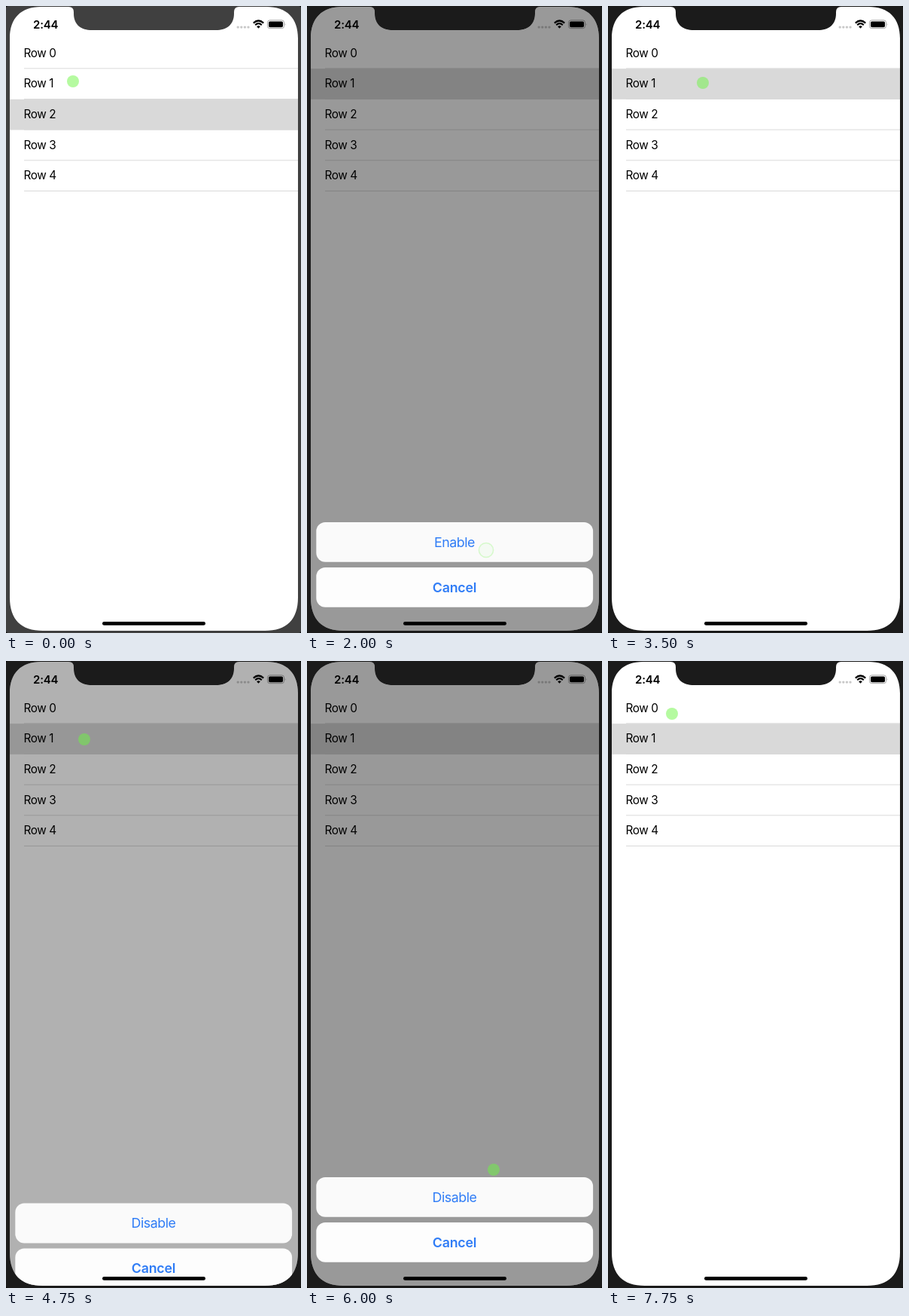
An HTML page for the animation above (8000 ms loop, 392 px wide and 832 px high).

```html
<!DOCTYPE html>
<html lang="en">
<head>
<meta charset="utf-8">
<title>Row action sheet</title>
<style>
  html, body { margin: 0; width: 100%; height: 100%; overflow: hidden; background: #000; }
  svg { display: block; width: 392px; height: 832px; font-family: Inter, Roboto, sans-serif; }
  .row { font-size: 15.3px; letter-spacing: -.4px; }
  .clock { font-size: 15px; font-weight: 600; letter-spacing: -.2px; }
  .button { font-size: 17.8px; letter-spacing: -.45px; text-anchor: middle; fill: #2f7cf6; }
  .bold { font-weight: 600; letter-spacing: -.2px; }
</style>
</head>
<body>
<svg viewBox="0 0 392 832">
  <defs>
    <clipPath id="screen">
      <path d="M47 1H83Q90 1 90 8V10C90 25 100 32 114 32H279C293 32 303 25 303 10V8Q303 1 310 1H346C373 1 388 16 388 43V785C388 814 373 829 344 829H49C20 829 5 814 5 785V43C5 16 20 1 47 1Z"/>
    </clipPath>
  </defs>
  <rect id="bezel" width="392" height="832" rx="3"/>
  <g clip-path="url(#screen)">
    <rect width="392" height="832" fill="#fff"/>
    <g id="list"></g>
    <rect id="selected" x="5" width="383" height="40.7" fill="#d9d9d9"/>
    <g id="labels"></g>
    <text class="clock" x="36" y="29.8">2:44</text>
    <g id="signal" fill="#c8c8c8"></g>
    <g fill="none" stroke="#000" stroke-width="2.2">
      <path d="M328.8 22.6Q335.5 16.4 342.2 22.6"/>
      <path d="M331.2 25.2Q335.5 21.2 339.8 25.2"/>
    </g>
    <path d="M333.1 27.2Q335.5 25.2 337.9 27.2L335.5 29.8Z"/>
    <rect x="347.5" y="18.9" width="22" height="10.8" rx="3" fill="#fff" stroke="#a3a3a3"/>
    <rect x="349" y="20.4" width="19" height="7.8" rx="1.7"/>
    <path d="M370.8 22.4Q372.4 24.3 370.8 26.2Z" fill="#a3a3a3"/>
    <rect id="dim" width="392" height="832"/>
    <g id="sheet">
      <rect x="12.3" y="685" width="367.8" height="52.8" rx="12" fill="#fafafa"/>
      <rect x="12.3" y="745" width="367.8" height="52.8" rx="12" fill="#fdfdfd"/>
      <text id="action" class="button" x="196" y="717.9"></text>
      <text class="button bold" x="196" y="777.9">Cancel</text>
    </g>
    <rect x="128" y="817" width="137" height="4.8" rx="2.4"/>
  </g>
  <circle id="touch"/>
</svg>
<script>
const $ = id => document.getElementById(id);
const LOOP = 8000, STEP = 250, ROW = 40.65, TOP = 42.2, TRAVEL = 147;

// pointer path: time, x, y
const path = [
  [0, 89, 100], [500, 80, 108], [750, 82, 122], [1750, 238, 720], [2000, 238, 722],
  [2500, 144, 175], [3500, 126, 102], [3750, 104, 104], [4750, 104, 104],
  [6000, 248, 675], [6250, 245, 708], [6500, 243, 711], [7500, 84, 47], [7750, 85, 70]
];
// action sheets: label, opening time, closing time
const sheets = [['Enable', 541, 2070], ['Disable', 4566, 6350]];
const presses = [750, 2000, 4500, 6250];

function add(parent, tag, attrs, text) {
  const el = document.createElementNS('http://www.w3.org/2000/svg', tag);
  for (const k in attrs) el.setAttribute(k, attrs[k]);
  if (text) el.textContent = text;
  $(parent).appendChild(el);
}

function set(id, attrs) {
  for (const k in attrs) $(id).setAttribute(k, attrs[k]);
}

for (let i = 0; i < 5; i++) {
  const y = TOP + i * ROW;
  add('list', 'rect', { x: 24, y: y + ROW - .5, width: 364, height: 1, fill: '#dadada' });
  add('labels', 'text', { class: 'row', x: 23.6, y: y + 25.4 }, 'Row ' + i);
}
for (let i = 0; i < 4; i++) add('signal', 'circle', { cx: 308.2 + i * 4.6, cy: 28.1, r: 1.7 });

// critically damped spring
function spring(ms) {
  const u = Math.max(0, ms) * .0148;
  return Math.min(1, 1.012 * (1 - (1 + u) * Math.exp(-u)));
}

function pointer(t) {
  let i = path.length - 1;
  while (path[i][0] > t) i--;
  const a = path[i], b = path[i + 1] || a;
  const u = b === a ? 0 : (t - a[0]) / (b[0] - a[0]);
  const e = u * u * (3 - 2 * u);
  return [a[1] + (b[1] - a[1]) * e, a[2] + (b[2] - a[2]) * e];
}

function draw(t) {
  const [label, open, close] = sheets[t < 4000 ? 0 : 1];
  const shown = t < close ? spring(t - open) : 1 - spring(t - close);
  set('bezel', { fill: t < 250 ? '#404040' : '#1b1b1b' });
  set('selected', { y: TOP + .3 + ROW * (t < 500 ? 2 : 1) });
  set('dim', { opacity: .4 * shown });
  set('sheet', {
    transform: `translate(0 ${TRAVEL * (1 - shown)})`,
    visibility: shown > 0 ? 'visible' : 'hidden'
  });
  if ($('action').textContent !== label) $('action').textContent = label;

  const [cx, cy] = pointer(t);
  const ring = presses.some(p => t >= p && t < p + STEP);
  set('touch', {
    cx, cy, r: ring ? 9.6 : 8,
    fill: '#6cf542', 'fill-opacity': ring ? .04 : .5,
    stroke: '#6cf542', 'stroke-opacity': ring ? .24 : 0, 'stroke-width': 1.5
  });
}

function tick() {
  const t = performance.now() % LOOP;
  draw(Math.floor(t / STEP) * STEP);
  requestAnimationFrame(tick);
}
tick();
</script>
</body>
</html>
```
